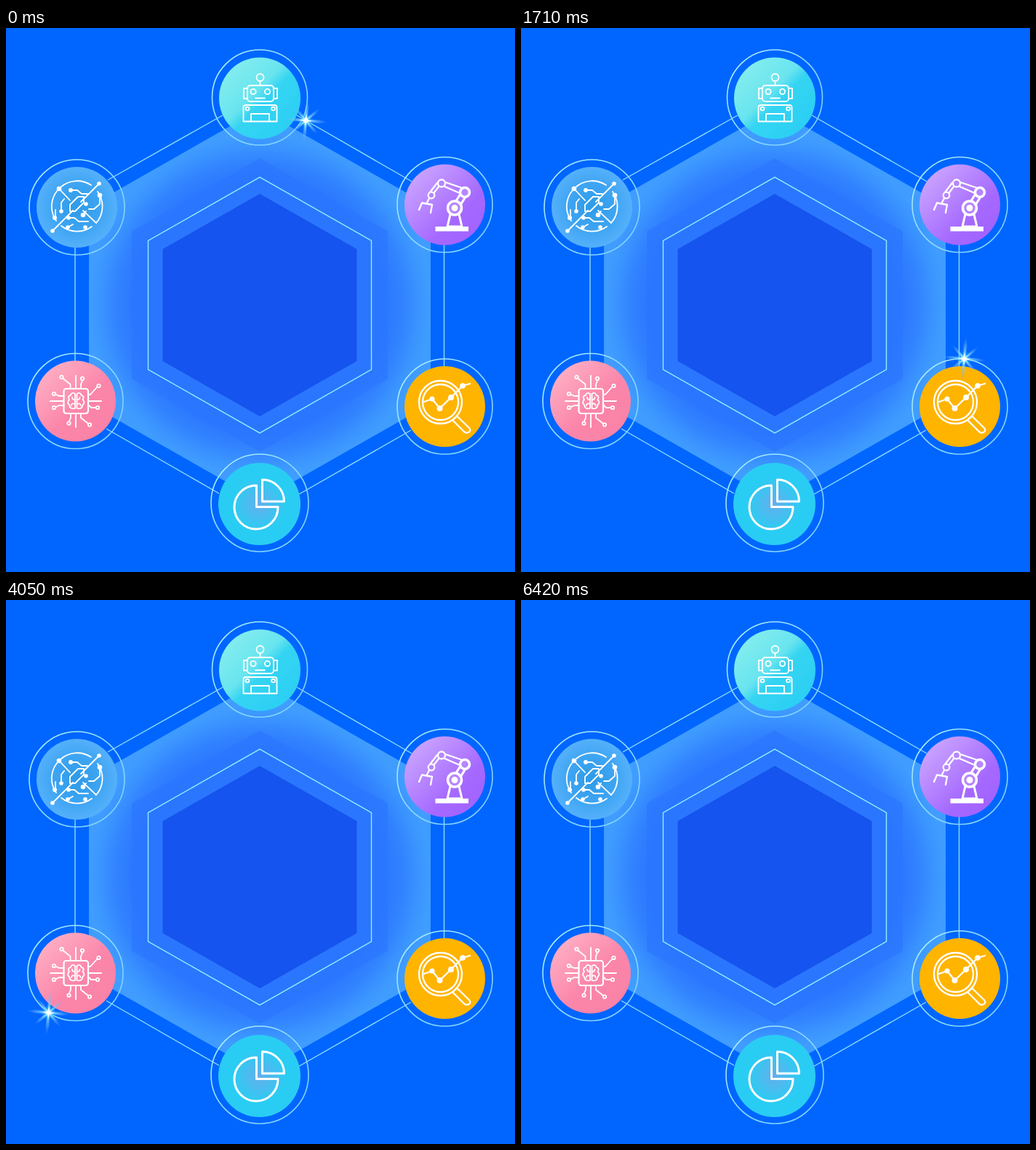
These frames come from a looping animation (700x748 px, 6.45 s). An HTML page:

```html
<!DOCTYPE html>
<html lang="en">
<head>
<meta charset="utf-8">
<title>Glint around a hexagon</title>
<style>
  html, body { margin: 0; width: 100%; height: 100%; overflow: hidden; background: #06f; }
  body { position: relative; }
  svg { position: absolute; left: 0; top: 0; display: block; }
  .icon { fill: none; stroke: #fff; stroke-width: 1.8; stroke-linecap: round; stroke-linejoin: round; }
  .bold { stroke-width: 2.3; }
  .dot { fill: #fff; stroke: none; }
  .ring { fill: none; stroke-width: 1.6; }

  #star {
    offset-path: path("M412 127 L549 206 A65.5 65.5 0 1 1 603.5 308.5 L603.5 454.5 A66 66 0 1 1 548.5 557 L412.5 634.5 A66.5 66.5 0 1 1 285 635.4 L147 556.2 A66 66 0 1 1 95.5 447.5 L95.5 312 A65.5 65.5 0 1 1 148.5 204.2 L290 124.5 A65.5 65.5 0 1 1 409 122.5 L412 127");
    offset-rotate: 0deg;
    animation: travel 6450ms linear infinite, vanish 6450ms step-end infinite;
  }
  @keyframes travel {
    0% { offset-distance: 0; }
    10.23% { offset-distance: 238px; }
    15.81% { offset-distance: 341px; }
    20.93% { offset-distance: 448px; }
    31.16% { offset-distance: 687px; }
    39.07% { offset-distance: 903.5px; }
    51.16% { offset-distance: 1197.5px; }
    61.4% { offset-distance: 1477px; }
    62.79% { offset-distance: 1504px; }
    71.63% { offset-distance: 1773px; }
    75.81% { offset-distance: 1866px; }
    81.86% { offset-distance: 1976px; }
    86.98% { offset-distance: 2161px; }
    92.33% { offset-distance: 2313px; }
    100% { offset-distance: 2495px; }
  }
  @keyframes vanish {
    0% { opacity: 1; }
    99.5%, 100% { opacity: 0; }
  }
</style>
</head>
<body>
<svg width="700" height="748" viewBox="0 0 700 748">
  <defs>
    <path id="hex" d="M0-153 133.5-77V77L0 153-133.5 77V-77Z" vector-effect="non-scaling-stroke"/>
    <radialGradient id="halo" gradientUnits="userSpaceOnUse" cx="0" cy="0" r="142">
      <stop offset=".69" stop-color="#2b77ff"/>
      <stop offset=".79" stop-color="#3283ff"/>
      <stop offset=".87" stop-color="#3a93ff"/>
      <stop offset=".94" stop-color="#409dff"/>
    </radialGradient>
    <linearGradient id="edge" x2="1" y2="1">
      <stop stop-color="#b4f4ff"/>
      <stop offset=".5" stop-color="#8ad8ff"/>
      <stop offset="1" stop-color="#7ccfff"/>
    </linearGradient>
    <linearGradient id="mint" x2="1" y2="1">
      <stop offset=".1" stop-color="#86eeee"/>
      <stop offset=".44" stop-color="#68e4ef"/>
      <stop offset=".54" stop-color="#35d4f2"/>
      <stop offset="1" stop-color="#27cdf4"/>
    </linearGradient>
    <linearGradient id="violet" x2="1" y2="1">
      <stop offset=".1" stop-color="#cba6ff"/>
      <stop offset=".65" stop-color="#a569ff"/>
      <stop offset="1" stop-color="#a05fff"/>
    </linearGradient>
    <linearGradient id="pink" x2="1" y2="1">
      <stop offset=".1" stop-color="#ffb0c5"/>
      <stop offset=".55" stop-color="#fb86aa"/>
      <stop offset="1" stop-color="#fa80a6"/>
    </linearGradient>
    <radialGradient id="aqua">
      <stop stop-color="#66aeec"/>
      <stop offset=".66" stop-color="#29cdf3"/>
    </radialGradient>
    <radialGradient id="sky">
      <stop stop-color="#2f9be6"/>
      <stop offset=".55" stop-color="#3da4f2"/>
      <stop offset="1" stop-color="#55b0fb"/>
    </radialGradient>
  </defs>

  <rect width="700" height="748" fill="#06f"/>

  <g transform="translate(349 381)">
    <use href="#hex" transform="scale(1.76)" fill="url(#halo)"/>
    <use href="#hex" transform="scale(1.318)" fill="#2b77ff" opacity=".7"/>
    <use href="#hex" transform="scale(1.15)" fill="none" stroke="#92edff" stroke-width="1.4"/>
    <use href="#hex" fill="#1554ee"/>
  </g>

  <path d="M400 120 558 211M602.5 298V466M557 553 403 641M293 640 138 551M95 458V302M140 209 298 120" fill="none" stroke="#8cdcff" stroke-width="1.4"/>

  <g class="ring" stroke="url(#edge)">
    <circle cx="349" cy="95.5" r="65.5"/>
    <circle cx="603.5" cy="243" r="65.5"/>
    <circle cx="603.5" cy="520.5" r="65.5"/>
    <circle cx="349" cy="653" r="67"/>
    <circle cx="95.5" cy="513" r="65.5"/>
    <circle cx="97.5" cy="246.5" r="65.5"/>
  </g>
  <circle cx="349" cy="96.5" r="56" fill="url(#mint)"/>
  <circle cx="603.5" cy="243" r="55.5" fill="url(#violet)"/>
  <circle cx="603.5" cy="520.5" r="55.5" fill="#ffb400"/>
  <circle cx="348.5" cy="654.5" r="56.5" fill="url(#aqua)"/>
  <circle cx="95.5" cy="513" r="55.5" fill="url(#pink)"/>
  <circle cx="97.5" cy="246.5" r="55.5" fill="url(#sky)"/>

  <!-- robot -->
  <g class="icon">
    <circle cx="349.5" cy="68" r="5"/>
    <path d="M349.5 73V79M332 83H327V97H332M368 83H373V97H368M343 96.5H356M337 128.500V118H362V128.500"/>
    <rect x="332" y="79" width="36" height="22" rx="4"/>
    <circle cx="340" cy="87.5" r="3.6"/>
    <circle cx="359.5" cy="87.5" r="3.6"/>
    <path d="M326.5 128.5V109Q326.5 106 330 106H369Q372.5 106 372.5 109V128.5Z"/>
    <circle cx="332" cy="111" r="2.4"/>
    <circle cx="367.5" cy="111" r="2.4"/>
  </g>

  <!-- robot arm -->
  <g class="icon bold">
    <path d="M604 212 626 219.5M602 217.5 624 227M596 217 589 226M582 234 579 240M568 250 572 240.5 586 243 584 254M593 213 583 226"/>
    <path d="M612 252 607 273H627L622 252" stroke-width="3"/>
    <path d="M631 226 618 247" stroke-width="11"/>
    <path d="M631 226 618 247" stroke="#ad76ff" stroke-width="5"/>
    <g fill="#b786ff">
      <circle cx="599" cy="213.5" r="5"/>
      <circle cx="585" cy="230" r="4.3"/>
      <circle cx="631" cy="226" r="6.5" stroke-width="3.5"/>
      <circle cx="617" cy="247.5" r="9.5" stroke-width="3.5"/>
    </g>
    <circle class="dot" cx="617" cy="247.5" r="4.5"/>
    <rect class="dot" x="590.5" y="273" width="45.5" height="6.5"/>
  </g>

  <!-- magnifier -->
  <g class="icon bold">
    <circle cx="597.5" cy="514.5" r="29.5"/>
    <circle cx="597.5" cy="514.5" r="24.5"/>
    <path d="M614 539 620 533.5 637 550Q640 554 636 556T629 554ZM575 514 586 510 596.5 523 612 508 628 492 638 489"/>
    <g class="dot">
      <circle cx="586" cy="510" r="3.5"/>
      <circle cx="596.5" cy="523" r="4"/>
      <circle cx="612" cy="508" r="4"/>
      <circle cx="628" cy="492" r="3.8"/>
    </g>
  </g>

  <!-- pie chart -->
  <path class="icon" style="stroke-width:3" d="M344.5 629A30 30 0 1 0 374 658.5H344.5ZM352.5 621A30 30 0 0 1 382.5 651H352.5Z"/>

  <!-- chip -->
  <g class="icon">
    <rect x="79.5" y="496" width="33.5" height="34" rx="3.5" stroke-width="2.2"/>
    <path d="M78.5 482 88.5 490V496M96 478V496M105 485 103 490V496M125 494 116 504H113M113 513H131M113 518 117 522H123M103 530V536L112.5 543.5M96 530V549M89 530V536L87 540.5M79.5 506H73L69 504M61 513H79M79.5 519H73L69 521"/>
    <g>
      <circle cx="76.5" cy="480" r="2.2"/>
      <circle cx="105" cy="482" r="2.2"/>
      <circle cx="127.5" cy="492" r="2.2"/>
      <circle cx="126" cy="522" r="2.2"/>
      <circle cx="115" cy="545.5" r="2.2"/>
      <circle cx="86.5" cy="543.5" r="2.2"/>
      <circle cx="66" cy="503" r="2.2"/>
      <circle cx="66" cy="522" r="2.2"/>
    </g>
    <path id="lobe" d="M95 503Q90 500 89 505 84 506 87 511 83 515 87 518 88 525 95 523ZM91 508Q91 511 95 511M95 517Q90 515 90 519"/>
    <use href="#lobe" transform="matrix(-1 0 0 1 192.5 0)"/>
  </g>

  <!-- circuit globe -->
  <g class="icon">
    <path d="M75 219A34.5 34.5 0 0 1 117 216M126 225A34.5 34.5 0 0 1 124 268M118 273A34.5 34.5 0 0 1 76 272M69 265A34.5 34.5 0 0 1 71 223"/>
    <path d="M64 279 92 251M103 239 128 214M73 221 88 237M106 251 124 268"/>
    <path d="M88 252V243L99 232H107V240L95 252Z"/>
    <path d="M89 223H98L104 228H112M76 252V240L80 235M68 261V250M86 261H94L100 266H113M85 274 92 270M106 257 110 252M129 230V242L121 249H114"/>
  </g>
  <g class="dot">
    <circle cx="64" cy="279" r="2.8"/>
    <circle cx="128" cy="214" r="2.8"/>
    <circle cx="73" cy="221" r="3.3"/>
    <circle cx="89" cy="223" r="3"/>
    <circle cx="129" cy="230" r="3.3"/>
    <circle cx="76" cy="252" r="2.8"/>
    <circle cx="67" cy="261" r="3"/>
    <circle cx="106" cy="257" r="3.3"/>
    <circle cx="86" cy="261" r="2.8"/>
    <circle cx="85" cy="274" r="2.8"/>
    <circle cx="109" cy="274" r="2.8"/>
    <circle cx="110" cy="242" r="2.8"/>
  </g>
</svg>

<svg id="star" width="80" height="80" viewBox="-40 -40 80 80">
  <defs>
    <radialGradient id="beam" gradientUnits="userSpaceOnUse" cx="0" cy="0" r="32">
      <stop stop-color="#fff"/>
      <stop offset=".2" stop-color="#9fecff" stop-opacity=".85"/>
      <stop offset=".5" stop-color="#78c4ff" stop-opacity=".55"/>
      <stop offset="1" stop-color="#62acff" stop-opacity="0"/>
    </radialGradient>
    <radialGradient id="glow">
      <stop stop-color="#4ff4ff"/>
      <stop offset=".4" stop-color="#25c8ff" stop-opacity=".7"/>
      <stop offset="1" stop-color="#25a0ff" stop-opacity="0"/>
    </radialGradient>
    <path id="ray" d="M-1 0-2.2-18 0-32 2.2-18 1 0Z"/>
    <g id="cross">
      <use href="#ray"/>
      <use href="#ray" transform="rotate(90)"/>
      <use href="#ray" transform="rotate(180)"/>
      <use href="#ray" transform="rotate(270)"/>
    </g>
  </defs>
  <circle r="11" fill="url(#glow)"/>
  <g transform="rotate(5)" fill="url(#beam)">
    <use href="#cross"/>
    <use href="#cross" transform="rotate(45) scale(.85)"/>
    <path d="M0-8 1.6-1.6 8 0 1.6 1.6 0 8-1.6 1.6-8 0-1.6-1.6Z" fill="#fff"/>
    <circle r="3" fill="#fff"/>
  </g>
</svg>
</body>
</html>
```
